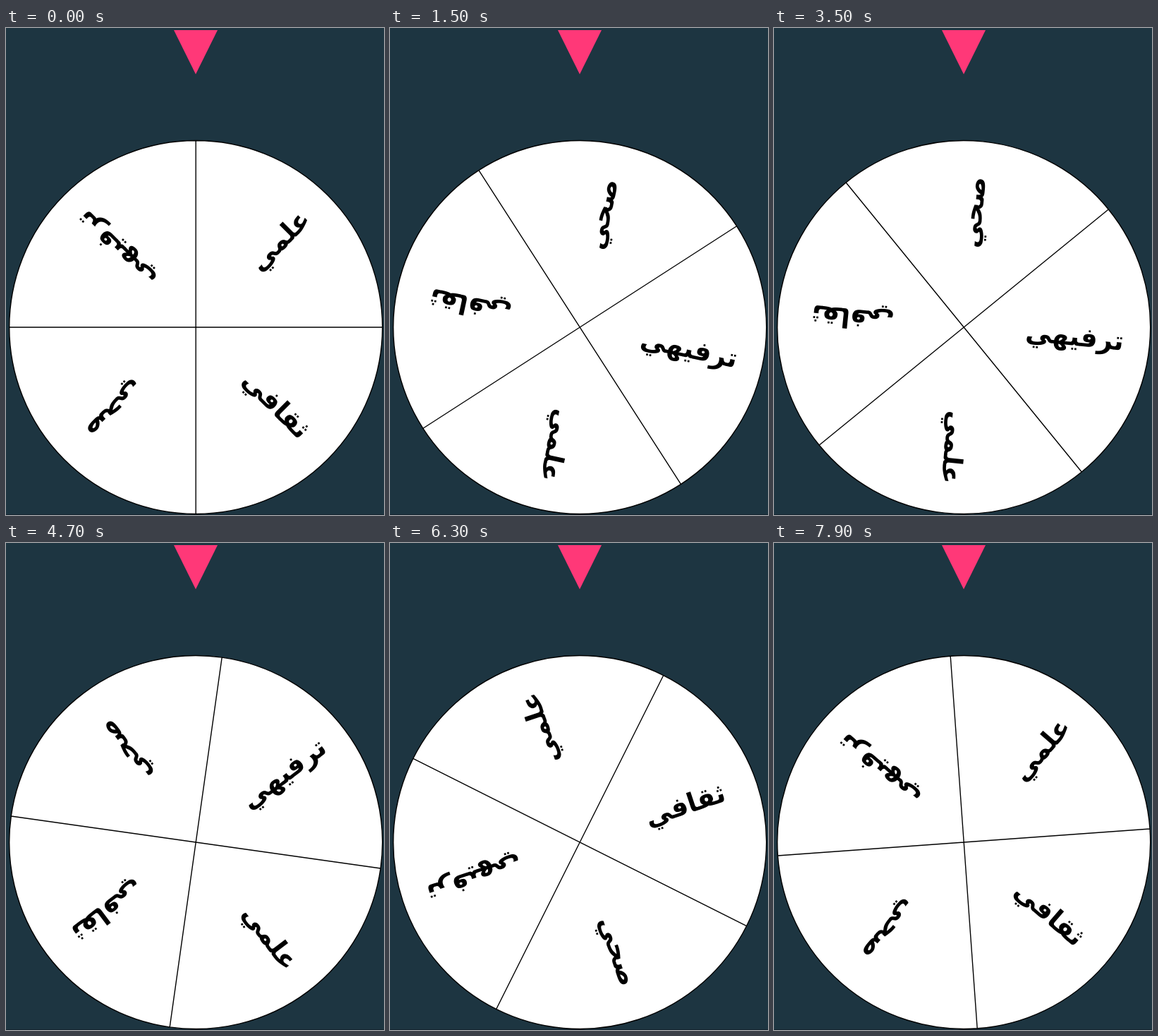
An HTML page with a canvas that plays this animation: 536x690 px, repeating every 8000 ms.

```html
<!DOCTYPE html>
<html lang="ar">
<head>
<meta charset="utf-8">
<title>Spinning wheel</title>
<style>
  html, body { margin: 0; width: 100%; height: 100%; overflow: hidden; background: #1d3541; }
  canvas { display: block; }
</style>
</head>
<body>
<canvas id="stage" width="536" height="690"></canvas>
<script>
const ctx = document.getElementById('stage').getContext('2d');
const LOOP = 8000, HOLD = 500, STEP = 200;
const CENTER = { x: 269.2, y: 424 }, RADIUS = 264.5, TEXT_RADIUS = 159;
const LABELS = ['علمي', 'ثقافي', 'صحي', 'ترفيهي'];
const LONGEST_LABEL = 135;

// Quartic ease-out towards TOTAL degrees, pinned at a few [step, degrees].
const TOTAL = 2525;
const PINS = [[0, 0], [1, 12], [6, 867.2], [12, 1607.66], [16, 1940.83],
              [22, 2258.04], [30, 2456.63], [38, 2515.88]];

const font = size => `bold ${size}px "DejaVu Sans", sans-serif`;

function labelSize() {
  ctx.font = font(100);
  const box = ctx.measureText('ترفيهي');
  return 100 * LONGEST_LABEL / (box.actualBoundingBoxLeft + box.actualBoundingBoxRight);
}

function wheelDegrees(time) {
  const step = time < HOLD ? 0 : 1 + Math.floor((time - HOLD) / STEP);
  const next = Math.max(1, PINS.findIndex(([s]) => s >= step));
  const [[s0, a0], [s1, a1]] = [PINS[next - 1], PINS[next]];
  const rest = angle => (1 - angle / TOTAL) ** 0.25;
  const k = (step - s0) / (s1 - s0);
  return TOTAL * (1 - (rest(a0) + (rest(a1) - rest(a0)) * k) ** 4);
}

function drawPointer() {
  ctx.fillStyle = '#ff3878';
  ctx.beginPath();
  ctx.moveTo(238, 3);
  ctx.lineTo(300, 3);
  ctx.lineTo(269, 65.5);
  ctx.fill();
}

function drawWheel(degrees) {
  ctx.save();
  ctx.translate(CENTER.x, CENTER.y);
  ctx.rotate(degrees * Math.PI / 180);
  ctx.lineWidth = 1.4;
  ctx.strokeStyle = '#000';
  ctx.fillStyle = '#fff';
  ctx.beginPath();
  ctx.arc(0, 0, RADIUS, 0, 2 * Math.PI);
  ctx.fill();
  ctx.moveTo(-RADIUS, 0);
  ctx.lineTo(RADIUS, 0);
  ctx.moveTo(0, -RADIUS);
  ctx.lineTo(0, RADIUS);
  ctx.stroke();

  ctx.fillStyle = '#000';
  ctx.font = font(size);
  ctx.textAlign = 'center';
  ctx.textBaseline = 'middle';
  ctx.rotate(-Math.PI / 4);
  for (const label of LABELS) {
    ctx.fillText(label, TEXT_RADIUS, 0);
    ctx.rotate(Math.PI / 2);
  }
  ctx.restore();
}

function draw() {
  ctx.fillStyle = '#1d3541';
  ctx.fillRect(0, 0, 536, 690);
  ctx.fillStyle = '#14242f';
  ctx.fillRect(0, 689, 536, 1);
  drawPointer();
  drawWheel(wheelDegrees(performance.now() % LOOP));
  requestAnimationFrame(draw);
}

const size = labelSize();
draw();
</script>
</body>
</html>
```
